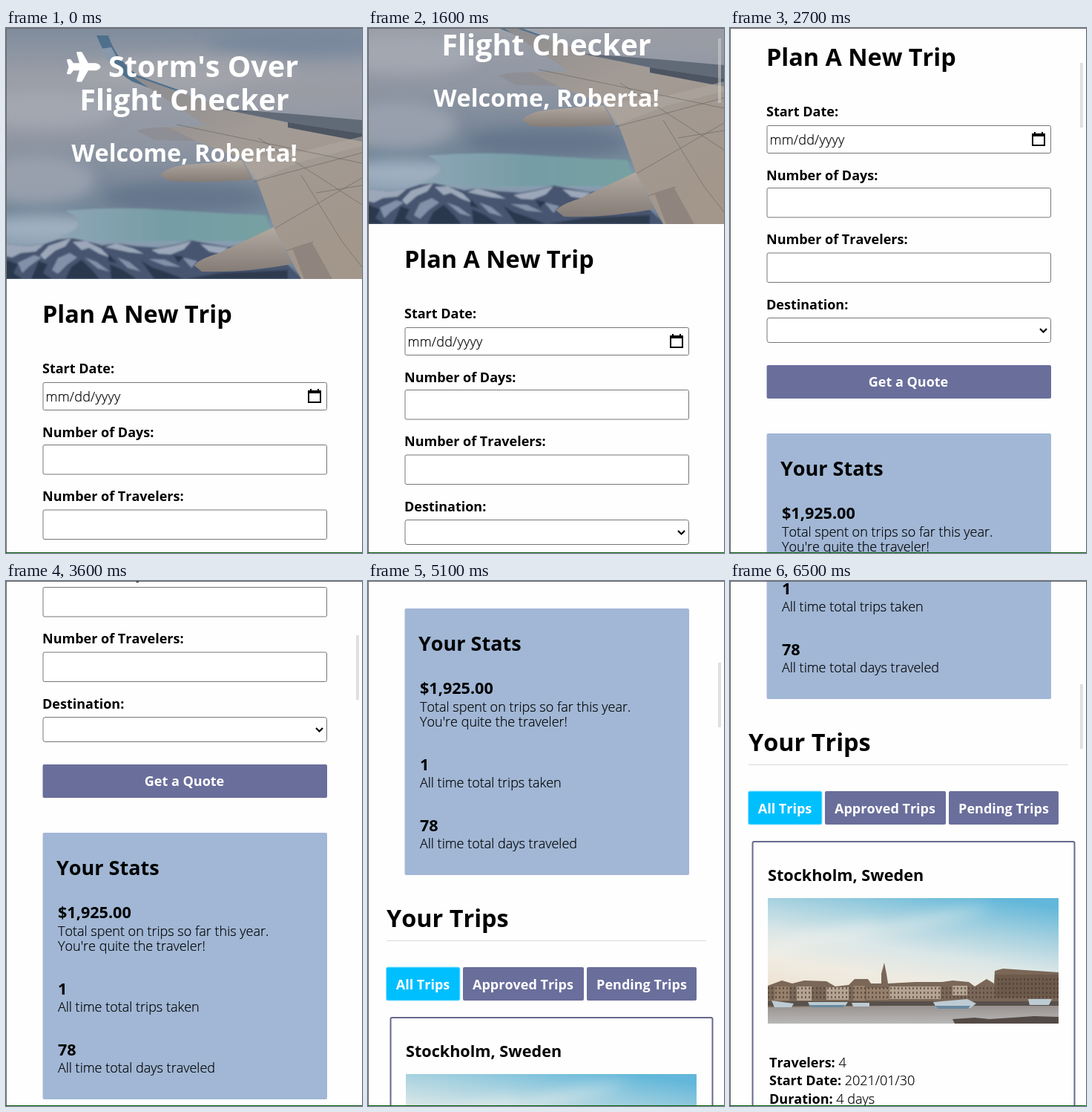
Write an HTML page that moves like this. It is 480 by 707 pixels and loops after 6.6 s.

```html
<!DOCTYPE html>
<html lang="en">
<head>
<meta charset="utf-8">
<title>Trip planner</title>
<style>
  @property --scroll {
    syntax: "<integer>";
    inherits: true;
    initial-value: 0;
  }
  html, body { margin: 0; width: 100%; height: 100%; overflow: hidden; background: #fefefe; }
  .stage {
    position: relative;
    width: 480px;
    height: 707px;
    overflow: hidden;
    animation: scroll 6600ms -1ms infinite;
  }
  .page { position: absolute; left: 0; top: calc(var(--scroll) * -1px); display: block; }
  .thumb {
    position: absolute;
    left: 472px;
    top: calc(5px + var(--scroll) * .1227px);
    width: 4px;
    height: 87px;
    background: rgba(205, 205, 205, .6);
    animation: show 6600ms -1ms infinite step-end;
  }
  .frame {
    position: absolute;
    inset: 0;
    border: solid #6c6c6c;
    border-width: 1px 0 0 1px;
  }
  .frame::after {
    content: "";
    position: absolute;
    left: -1px; right: 0; bottom: 0;
    height: 1px;
    background: #0a6210;
  }

  /* one step per 100 ms */
  @keyframes scroll {
    0%       { --scroll: 0;    animation-timing-function: step-end; }
    15.1515% { --scroll: 0;    animation-timing-function: steps(3); }
    19.6969% { --scroll: 22;   animation-timing-function: steps(3); }
    24.2424% { --scroll: 74;   animation-timing-function: steps(11); }
    40.9090% { --scroll: 346;  animation-timing-function: steps(9); }
    54.5454% { --scroll: 553;  animation-timing-function: steps(7); }
    65.1515% { --scroll: 680;  animation-timing-function: steps(8); }
    77.2727% { --scroll: 855;  animation-timing-function: steps(7); }
    87.8787% { --scroll: 980;  animation-timing-function: steps(7); }
    98.4848%, 100% { --scroll: 1092; }
  }
  @keyframes show {
    0% { opacity: 0; }
    15.1515%, 100% { opacity: 1; }
  }

  text { font: 700 18px "Open Sans", "Noto Sans", sans-serif; font-kerning: none; fill: #000; }
  .light { font-weight: 300; stroke: #000; stroke-width: .2px; }
  .date { letter-spacing: .25px; }
  .title { font-size: 39.6px; fill: #fff; }
  .h1 { font-size: 32.4px; }
  .h2 { font-size: 27px; }
  .h3 { font-size: 21.6px; }
  .mid { text-anchor: middle; }
  .white { fill: #fff; }
  .field { fill: #fff; stroke: #767676; }
  .btn { fill: #6a6e9b; }
</style>
</head>
<body>
<div class="stage">
<svg class="page" width="480" height="1900" viewBox="0 0 480 1900">
  <defs>
    <linearGradient id="sky" x2="0" y2="1">
      <stop offset="0" stop-color="#7f8c9d"/>
      <stop offset=".2" stop-color="#9b9fa8"/>
      <stop offset=".45" stop-color="#9097a3"/>
      <stop offset=".62" stop-color="#7b8899"/>
      <stop offset=".72" stop-color="#738799"/>
      <stop offset=".85" stop-color="#8a9eb1"/>
      <stop offset="1" stop-color="#687990"/>
    </linearGradient>
    <linearGradient id="lake">
      <stop offset="0" stop-color="#8ea5b5"/>
      <stop offset=".5" stop-color="#759da6"/>
      <stop offset="1" stop-color="#76a1a1"/>
    </linearGradient>
    <linearGradient id="wing" x2=".6" y2="1">
      <stop offset="0" stop-color="#8a8a8f"/>
      <stop offset=".45" stop-color="#a29b95"/>
      <stop offset="1" stop-color="#a3978c"/>
    </linearGradient>
    <linearGradient id="pod" x2="0" y2="1">
      <stop offset="0" stop-color="#b2a9a1"/>
      <stop offset="1" stop-color="#857c77"/>
    </linearGradient>
    <linearGradient id="dusk" x1=".8" y1="0" x2=".5" y2=".85">
      <stop offset="0" stop-color="#62b7da"/>
      <stop offset=".28" stop-color="#a3d0df"/>
      <stop offset=".55" stop-color="#dae6e7"/>
      <stop offset=".8" stop-color="#efebe1"/>
      <stop offset="1" stop-color="#efe4d5"/>
    </linearGradient>
    <linearGradient id="bay" x2="0" y2="1">
      <stop offset="0" stop-color="#938d89"/>
      <stop offset="1" stop-color="#b8b7b7"/>
    </linearGradient>
    <pattern id="panes" width="5" height="6" patternUnits="userSpaceOnUse">
      <path d="M1 1h2v3h-2z" fill="#43372f" opacity=".6"/>
    </pattern>
    <filter id="soft" x="-30%" y="-60%" width="160%" height="220%"><feGaussianBlur stdDeviation="9"/></filter>
    <filter id="haze" x="-10%" y="-10%" width="120%" height="120%"><feGaussianBlur stdDeviation=".9"/></filter>
    <clipPath id="heroBox"><path d="M0 0H480V338H0z"/></clipPath>
    <clipPath id="cityBox"><path d="M51 1519H443V1688H51z"/></clipPath>
  </defs>
  <path d="M0 0H480V1900H0z" fill="#fefefe"/>

  <!-- view over the wing -->
  <g clip-path="url(#heroBox)">
    <path d="M0 0H480V338H0z" fill="url(#sky)"/>
    <g filter="url(#soft)">
      <ellipse cx="50" cy="110" rx="100" ry="26" fill="#a9adb5" opacity=".7"/>
      <ellipse cx="240" cy="60" rx="150" ry="24" fill="#a8a8ae" opacity=".6"/>
      <ellipse cx="400" cy="20" rx="130" ry="18" fill="#77889d" opacity=".8"/>
      <ellipse cx="400" cy="85" rx="110" ry="18" fill="#9a9ca4" opacity=".7"/>
      <ellipse cx="40" cy="205" rx="80" ry="32" fill="#9fa6b2" opacity=".8"/>
      <ellipse cx="240" cy="228" rx="110" ry="20" fill="#64758b" opacity=".9"/>
      <ellipse cx="50" cy="270" rx="80" ry="16" fill="#a0b0c1"/>
    </g>
    <path d="M80 246Q150 240 220 245T350 252L362 287H220Q130 290 70 282Q120 264 80 246z" fill="url(#lake)" filter="url(#haze)"/>
    <g filter="url(#haze)">
      <path d="M0 291L30 294 52 291 70 285 88 283 108 287 130 293 148 290 175 294 205 296 228 292 250 286 270 290 300 295 350 290 400 338H0z" fill="#475570"/>
      <path d="M0 291L30 294 52 291 40 301 20 303 8 309 0 307zM58 293L88 283 80 294 66 300 52 312 46 306zM90 288L108 287 128 297 140 309 126 304 112 296 102 299zM134 295L148 290 172 297 186 304 166 302 152 299zM196 299L228 293 250 287 240 298 222 305 206 304zM262 291L300 296 290 304 274 301z" fill="#9ca8ba"/>
      <path d="M16 316L38 306 48 309 30 322 22 330zM70 310L86 303 96 309 82 319 70 331 62 326zM106 309L122 315 140 328 124 324zM150 309L166 315 182 328 164 323zM192 311L214 312 236 322 214 320zM238 309L258 314 250 323z" fill="#8391a8"/>
      <path d="M0 312L16 318 10 330 22 338H0zM44 314L56 318 50 330 62 338H34zM88 322L102 312 116 326 126 338H80zM138 304L150 317 138 314zM140 318L158 326 176 338H142zM182 313L196 322 214 328 240 338H200zM226 306L240 308 232 316z" fill="#2b374e"/>
      <path d="M290 330L380 326V338H240z" fill="#2f3a50"/>
    </g>
    <path d="M122 10H138Q148 42 178 64L240 86 220 91 170 72Q140 55 122 10z" fill="#4f708c"/>
    <path d="M128 28L142 26 151 42 138 45z" fill="#8799aa"/>
    <path d="M165 62L300 109 480 152V338H398L362 270 338 205 318 176 250 150 214 134 270 132z" fill="url(#wing)"/>
    <path d="M285 108L390 116 480 124V142L380 127z" fill="#616a77"/>
    <path d="M380 127L480 142V153L380 134z" fill="#4d5562"/>
    <path d="M318 176L400 166 480 146V159L405 178 334 205z" fill="#b0a8a1" opacity=".6"/>
    <g fill="none" stroke="#6b6665" opacity=".65">
      <path d="M230 130L480 182M334 207L480 168M362 270L480 202M340 148L480 238M398 198L452 286 480 322M378 300L414 288M418 222L480 212"/>
    </g>
    <path d="M208 198Q218 186 245 184L318 178 332 204Q270 209 220 206z" fill="url(#pod)"/>
    <path d="M176 138Q195 133 220 134L256 152 200 151z" fill="#8e8b8f" opacity=".7"/>
    <path d="M254 320Q260 311 285 304L361 268 386 318Q320 330 264 328z" fill="url(#pod)"/>
    <path d="M386 296L412 288 440 338H402z" fill="#8f857e"/>
  </g>
  <path transform="translate(82 32) scale(.079)" fill="#fff" d="M480 192H366L261 8Q256 0 247 0H181Q163 3 166 20L215 192H112L69 134Q64 128 56 128H16Q-1 131 0 148L32 256 0 364Q-1 381 16 384H56Q64 384 69 378L112 320H215L166 492Q163 509 181 512H247Q256 512 261 504L366 320H480C515 320 576 291 576 256S515 192 480 192z"/>
  <text class="title" x="138" y="66">Storm's Over</text>
  <text class="title mid" x="240.5" y="111">Flight Checker</text>
  <text class="h1 white mid" x="240.5" y="180">Welcome, Roberta!</text>

  <!-- form -->
  <text class="h1" x="49" y="397">Plan A New Trip</text>
  <text x="49" y="465">Start Date:</text>
  <rect class="field" x="50" y="477.5" width="382.5" height="37" rx="2"/>
  <text class="light date" x="53.5" y="502.5">mm/dd/yyyy</text>
  <path d="M408 489H424V504H408z" fill="none" stroke="#000" stroke-width="2"/>
  <path d="M407 488H425V492H407zM410 486h2v3h-2zM420 486h2v3h-2z"/>
  <text x="49" y="550.5">Number of Days:</text>
  <rect class="field" x="50" y="561.5" width="382.5" height="39.5" rx="2"/>
  <text x="49" y="637">Number of Travelers:</text>
  <rect class="field" x="50" y="649" width="382.5" height="39.5" rx="2"/>
  <text x="49" y="724.5">Destination:</text>
  <rect class="field" x="50" y="736.5" width="382.5" height="33" rx="3"/>
  <path d="M418 751l4.5 4.5 4.5-4.5" fill="none" stroke="#000" stroke-width="2.2"/>
  <rect class="btn" x="49.5" y="800" width="383.5" height="45" rx="2"/>
  <text class="white mid" x="240.5" y="829">Get a Quote</text>

  <!-- stats -->
  <rect x="49.5" y="892" width="383.5" height="359" rx="2" fill="#a1b7d5"/>
  <text class="h2" x="68" y="949">Your Stats</text>
  <text class="h3" x="70" y="1007">$1,925.00</text>
  <text class="light" x="70" y="1030.5">Total spent on trips so far this year.</text>
  <text class="light" x="70" y="1051">You're quite the traveler!</text>
  <text class="h3" x="70" y="1109.5">1</text>
  <text class="light" x="70" y="1133">All time total trips taken</text>
  <text class="h3" x="70" y="1191.5">78</text>
  <text class="light" x="70" y="1215">All time total days traveled</text>

  <!-- trips -->
  <text class="h1" x="25" y="1321">Your Trips</text>
  <path d="M25 1339.5H456" stroke="#d9d9d9"/>
  <rect x="24" y="1374.5" width="100.5" height="46" rx="3" fill="#8fe3ff"/>
  <rect x="25" y="1375.5" width="98.5" height="44" rx="2" fill="#00bfff"/>
  <rect class="btn" x="128" y="1375" width="163" height="45" rx="2"/>
  <rect class="btn" x="295" y="1375" width="148" height="45" rx="2"/>
  <g class="mid">
    <text class="white" x="74" y="1404.5">All Trips</text>
    <text class="white" x="209" y="1404.5">Approved Trips</text>
    <text class="white" x="369" y="1404.5">Pending Trips</text>
  </g>
  <rect x="30.5" y="1443" width="434" height="500" rx="2" fill="#fefefe" stroke="#66698c" stroke-width="2"/>
  <text class="h3" x="51" y="1495.5">Stockholm, Sweden</text>

  <!-- waterfront -->
  <g clip-path="url(#cityBox)">
    <path d="M51 1519H443V1688H51z" fill="url(#dusk)"/>
    <g filter="url(#soft)" fill="#f2f3ee" opacity=".5">
      <ellipse cx="110" cy="1575" rx="95" ry="9" transform="rotate(-14 110 1575)"/>
      <ellipse cx="240" cy="1555" rx="110" ry="7" transform="rotate(-12 240 1555)"/>
    </g>
    <path d="M51 1660H443V1688H51z" fill="url(#bay)"/>
    <path d="M51 1637L70 1630 84 1634 100 1630 130 1631 142 1638 160 1636 168 1628 186 1628 190 1634 204 1634 204 1621 208 1606 211 1621 213 1634 250 1632 286 1632 300 1630 322 1632 330 1638 346 1628 356 1634 357 1617 368 1614 443 1619V1658L300 1663 51 1666z" fill="#7a6757"/>
    <path d="M130 1639H160V1656H130zM215 1638H284V1655H215zM90 1638H110V1657H90zM300 1637H320V1650H300z" fill="#b5a491"/>
    <path d="M166 1637H182V1657H166zM184 1640H214V1656H184zM60 1638H80V1657H60z" fill="#97806c"/>
    <path d="M357 1622H443V1653H357z" fill="#6d5a4b"/>
    <path d="M51 1638H443V1656H51zM360 1624H443V1639H360z" fill="url(#panes)"/>
    <path d="M51 1658H443V1664H51z" fill="#58504b"/>
    <path d="M56 1657l30 4-3 5H60zM105 1659h54l-4 6H108zM164 1660h24v5h-22zM274 1659l46-4 12 6-8 6H278zM402 1655h32l-4 8H404z" fill="#bdcbd3"/>
    <path d="M276 1664h48l-3 4H280zM106 1663h50l-3 3H110z" fill="#68899e"/>
    <path d="M300 1682L330 1680 350 1682 410 1678 443 1679V1688H303z" fill="#544a45"/>
  </g>

  <text x="53" y="1746.5">Travelers: <tspan class="light">4</tspan></text>
  <text x="53" y="1771">Start Date: <tspan class="light">2021/01/30</tspan></text>
  <text x="53" y="1795.5">Duration: <tspan class="light">4 days</tspan></text>
</svg>
<div class="thumb"></div>
<div class="frame"></div>
</div>
</body>
</html>
```
